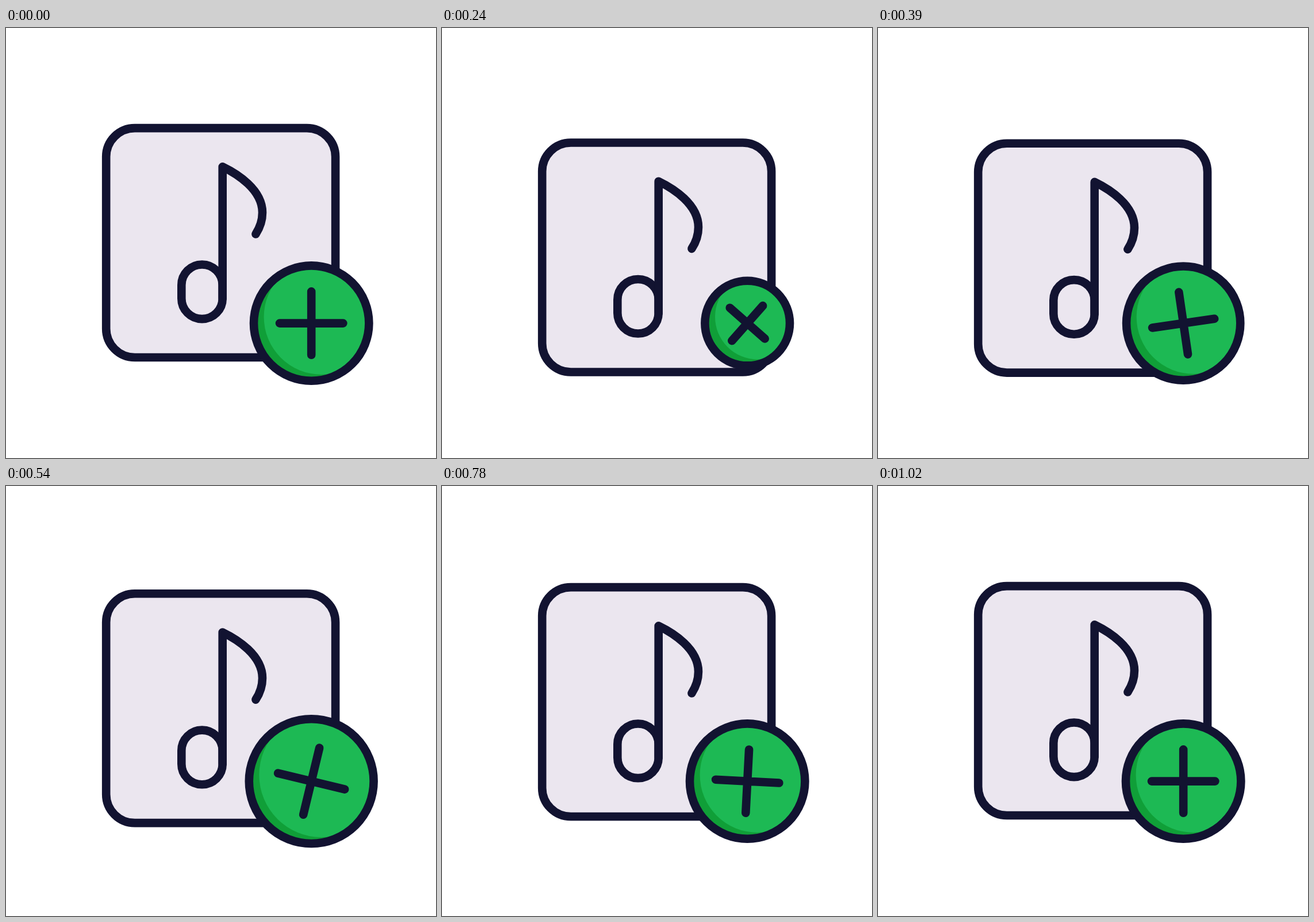
Write an HTML page with a canvas that moves like this. It is 748x748 px and loops after 3.05 s.

```html
<!DOCTYPE html>
<html lang="en">
<head>
<meta charset="utf-8">
<title>Add music</title>
<style>
  html, body { margin: 0; width: 100%; height: 100%; overflow: hidden; background: #fff; }
  canvas { display: block; width: 100vw; height: 100vh; }
</style>
</head>
<body>
<canvas id="stage" width="748" height="748"></canvas>
<script>
const ctx = document.getElementById('stage').getContext('2d');
const LOOP = 3050, STEP = 30, LAST = 34;
const INK = '#121331', PANEL = '#ebe6ef', GREEN = '#1db954', SHADE = '#109f38';

// Ease with control points (x1, 0) and (x2, 1)
function ease(u, x1, x2) {
  let lo = 0, hi = 1;
  for (let i = 0; i < 24; i++) {
    const t = (lo + hi) / 2, r = 1 - t;
    const x = 3 * t * r * r * x1 + 3 * t * t * r * x2 + t * t * t;
    if (x < u) lo = t; else hi = t;
  }
  return lo * lo * (3 - 2 * lo);
}

// Keys are [step, value, x2 of the ease that leads to the key]
function track(keys, n) {
  for (let i = 1; i < keys.length; i++) {
    const [a, from] = keys[i - 1], [b, to, x2 = 2 / 3] = keys[i];
    if (n < b) return from + (to - from) * ease((n - a) / (b - a), 1 / 3, x2);
  }
  return keys[keys.length - 1][1];
}

const DROP = [[0, 0], [10, 28.4], [34, 0, 0.18]];
const SCALE = [[0, 1], [7.5, 0.733, 0.36], [16, 1.0915], [26, 1]];
const TURN = [[0, 0], [18.5, 103.8], [34, 90, 0.18]];

function circle(x, y, r) {
  ctx.beginPath();
  ctx.arc(x, y, r, 0, Math.PI * 2);
}

function drawPanel(drop) {
  ctx.save();
  ctx.translate(0, drop);

  ctx.beginPath();
  ctx.roundRect(174.2, 174.1, 398.9, 398.9, 49.9);
  ctx.fillStyle = PANEL;
  ctx.fill();
  ctx.stroke();

  // Note head
  ctx.beginPath();
  ctx.roundRect(305.3, 411.5, 71.4, 94.6, 35.7);
  ctx.stroke();

  // Stem and flag
  ctx.beginPath();
  ctx.moveTo(376.7, 470.4);
  ctx.lineTo(376.7, 241.3);
  ctx.bezierCurveTo(402, 253.5, 446, 281, 446, 321);
  ctx.bezierCurveTo(446, 335, 441.5, 347.5, 434.4, 358.4);
  ctx.stroke();
  ctx.restore();
}

function drawBadge(scale, turn) {
  const r = 100.2 * scale, arm = 0.551 * r;
  ctx.save();
  ctx.translate(531.2, 513.6);

  circle(0, 0, r);
  ctx.fillStyle = SHADE;
  ctx.fill();
  ctx.save();
  ctx.clip();
  circle(17.6, -11, r);
  ctx.fillStyle = GREEN;
  ctx.fill();
  ctx.restore();
  circle(0, 0, r);
  ctx.stroke();

  ctx.rotate(turn * Math.PI / 180);
  ctx.beginPath();
  ctx.moveTo(-arm, 0);
  ctx.lineTo(arm, 0);
  ctx.moveTo(0, -arm);
  ctx.lineTo(0, arm);
  ctx.stroke();
  ctx.restore();
}

function draw(ms) {
  const n = Math.min(LAST, Math.floor((ms % LOOP) / STEP));
  ctx.fillStyle = '#fff';
  ctx.fillRect(0, 0, 748, 748);
  ctx.strokeStyle = INK;
  ctx.lineWidth = 14.6;
  ctx.lineCap = ctx.lineJoin = 'round';
  drawPanel(track(DROP, n));
  drawBadge(track(SCALE, n), track(TURN, n));
}

let start;
function tick(now) {
  start ??= now;
  draw(Math.max(0, now - start));
  requestAnimationFrame(tick);
}
draw(0);
requestAnimationFrame(tick);
</script>
</body>
</html>
```
